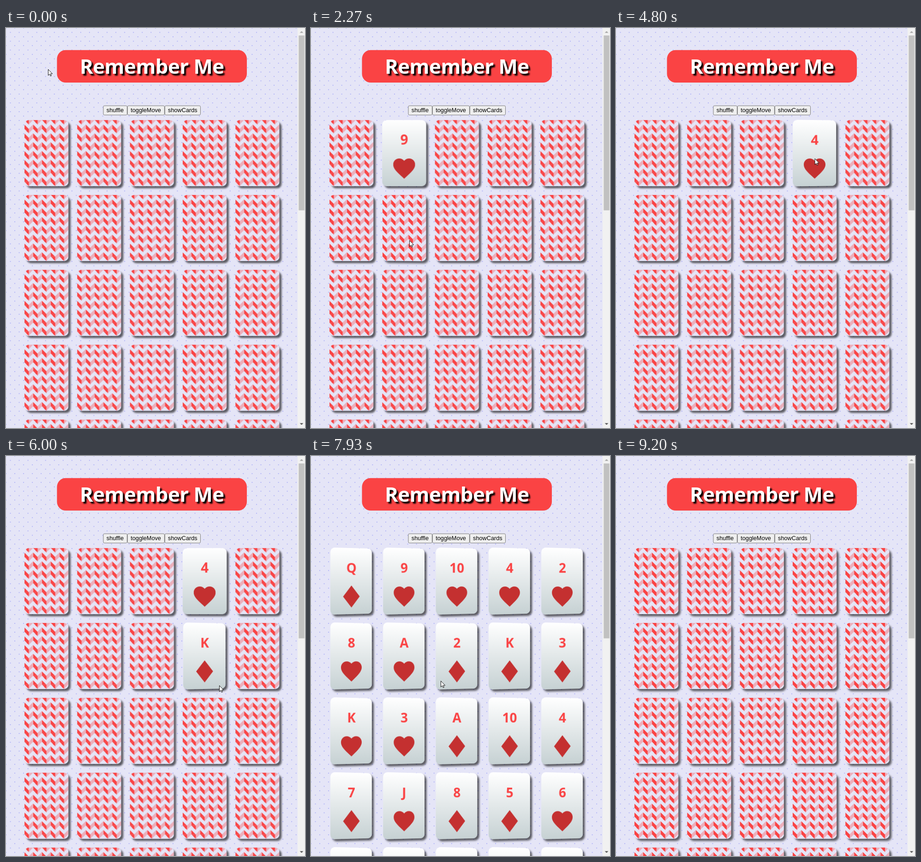
Write an HTML page that moves like this. It is 648 px wide and 865 px high and loops after 9790 ms.

```html
<!DOCTYPE html>
<html lang="en">
<head>
<meta charset="utf-8">
<title>Remember Me</title>
<style>
:root { --red: #fa4344; --pink: #fa434455; --bg: #e5e5f7; --loop: 9790ms; }
html, body { margin: 0; width: 100%; height: 100%; overflow: hidden; background: var(--bg); }
#page {
  position: absolute; left: 0; top: 0; width: 681px; height: 909px; overflow: hidden;
  transform: scale(.9525); transform-origin: 0 0;
  background:
    radial-gradient(#444cf7b0 .4px, #444cf700 1px) 0 0 / 20px 20px,
    radial-gradient(#444cf7b0 .4px, #444cf700 1px) 10px 10px / 20px 20px,
    var(--bg);
}
h1 {
  position: absolute; left: 116px; top: 50.4px; width: 432px; height: 73.5px; margin: 0;
  border-radius: 20px; background: var(--red); color: #fff; text-align: center;
  font: bold 46px/72px "Open Sans", "Noto Sans", sans-serif; letter-spacing: -.6px;
  text-shadow: 4px 4px 3px #000;
}
#bar { position: absolute; left: 0; top: 176.4px; width: 664px; display: flex; justify-content: center; }
#bar span {
  box-sizing: border-box; height: 22px; padding: 0 7px; border: 1px solid #767676; border-radius: 3px;
  background: #efefef; color: #000; font: 13.333px/20px "Liberation Sans", Arial, sans-serif;
}
#bar .hot { animation: hover var(--loop) step-end infinite; }
@keyframes hover {
  0%, 78%, 100% { background: #efefef; border-color: #767676; }
  72.5% { background: #e3e3e3; border-color: #4f4f4f; }
}

#deck { position: absolute; left: 32px; top: 199px; width: 600px; display: flex; flex-wrap: wrap; }
.card {
  position: relative; width: 100px; height: 150px; margin: 10px;
  transform-style: preserve-3d; animation: all var(--loop) ease infinite;
}
.face {
  position: absolute; inset: 0; border-radius: 10px; backface-visibility: hidden;
  box-shadow: 5px 5px 4px rgba(0, 0, 0, .6);
}
.back {
  background:
    linear-gradient(135deg, var(--pink) 25%, transparent 25%) -10px 0 / 20px 20px,
    linear-gradient(225deg, var(--red) 25%, transparent 25%) -10px 0 / 20px 20px,
    linear-gradient(315deg, var(--pink) 25%, transparent 25%) 0 0 / 20px 20px,
    linear-gradient(45deg, var(--red) 25%, var(--bg) 25%) 0 0 / 20px 20px;
}
.front { transform: rotateY(180deg); background: linear-gradient(#fff, #c6d1d3); }
.front b {
  position: absolute; left: 0; top: 24px; width: 100%; text-align: center; color: var(--red);
  font: bold 31px/40px "Open Sans", "Noto Sans", sans-serif;
}
.front svg { position: absolute; left: 25px; top: 85px; width: 50px; height: 50px; fill: #c43030; }

/* each card turns over on its click and back with its pair; all turn at the end */
@keyframes all {
  0%, 76.02%, 94.4%, 100% { transform: perspective(1000px) rotateY(0deg); }
  84.19%, 86.23% { transform: perspective(1000px) rotateY(-180deg); }
}
@keyframes pick1 {
  0%, 9.04%, 41.18%, 76.02%, 94.4%, 100% { transform: perspective(1000px) rotateY(0deg); }
  17.21%, 33.01%, 84.19%, 86.23% { transform: perspective(1000px) rotateY(-180deg); }
}
@keyframes pick2 {
  0%, 22.73%, 41.18%, 76.02%, 94.4%, 100% { transform: perspective(1000px) rotateY(0deg); }
  30.9%, 33.01%, 84.19%, 86.23% { transform: perspective(1000px) rotateY(-180deg); }
}
@keyframes pick3 {
  0%, 43.16%, 74.41%, 76.02%, 94.4%, 100% { transform: perspective(1000px) rotateY(0deg); }
  51.33%, 66.24%, 84.19%, 86.23% { transform: perspective(1000px) rotateY(-180deg); }
}
@keyframes pick4 {
  0%, 56.03%, 74.41%, 76.02%, 94.4%, 100% { transform: perspective(1000px) rotateY(0deg); }
  64.2%, 66.24%, 84.19%, 86.23% { transform: perspective(1000px) rotateY(-180deg); }
}

#scroll { position: absolute; left: 664px; top: 0; width: 17px; height: 909px; background: #f1f1f1; }
#scroll i { position: absolute; left: 2px; top: 17px; width: 13px; height: 397px; background: #c1c1c1; }
#scroll svg { position: absolute; left: 0; top: 0; }

#cursor {
  position: absolute; left: 0; top: 0; width: 14px; height: 20px; overflow: visible;
  animation: move var(--loop) linear infinite;
}
@keyframes move {
  0%, .5% { transform: translate(91px, 89px); }
  1.3% { transform: translate(190px, 130px); }
  2% { transform: translate(325px, 205px); }
  2.7% { transform: translate(285px, 250px); }
  3.3%, 5.1% { transform: translate(246px, 264px); }
  6.8%, 14% { transform: translate(235px, 265px); }
  16.2% { transform: translate(287px, 400px); }
  17.8% { transform: translate(262px, 493px); }
  19.1% { transform: translate(230px, 468px); }
  21.1%, 26% { transform: translate(213px, 459px); }
  31.3% { transform: translate(499px, 588px); }
  33.4%, 37.4% { transform: translate(502px, 584px); }
  40.8%, 49% { transform: translate(430px, 280px); }
  53.1% { transform: translate(476px, 474px); }
  54.4%, 56.5% { transform: translate(468px, 476px); }
  59%, 61.3% { transform: translate(462px, 496px); }
  66%, 68% { transform: translate(462px, 497px); }
  73%, 77.2% { transform: translate(387px, 182px); }
  81%, 82% { transform: translate(281px, 486px); }
  85.8%, 100% { transform: translate(281px, 880px); }
}
</style>
</head>
<body>
<svg width="0" height="0" style="position:absolute">
  <symbol id="h" viewBox="0 0 50 50"><path d="M25 48L21.4 44.7C8.5 33 0 25.300 0 15.900 0 8.200 6 2.200 13.700 2.200 18.100 2.200 22.300 4.200 25 7.400 27.700 4.200 31.900 2.200 36.300 2.200 44 2.200 50 8.200 50 15.900 50 25.300 41.500 33 28.600 44.700Z"/></symbol>
  <symbol id="d" viewBox="0 0 50 50"><path d="M25 0L45 25 25 50 5 25Z"/></symbol>
</svg>
<div id="page">
  <h1>Remember Me</h1>
  <div id="bar"><span>shuffle</span><span>toggleMove</span><span class="hot">showCards</span></div>
  <div id="deck"></div>
  <div id="scroll">
    <i></i>
    <svg width="17" height="909"><path d="M4.500 11h8l-4-4z" fill="#a3a3a3"/><path d="M4.500 897h8l-4 4z" fill="#505050"/></svg>
  </div>
</div>
<svg id="cursor"><path d="M.5 .5V13.500L3.500 10.700 5.400 15 7.300 14.200 5.500 10H9.600Z" fill="#fff" stroke="#000" stroke-width=".9"/></svg>
<script>
const cards = "Qd 9h 10h 4h 2h 8h Ah 2d Kd 3d Kh 3h Ad 10d 4d 7d Jh 8d 5d 6h 9d Jd Qh 5h 7h".split(" ");
const picks = { 1: "pick1", 6: "pick2", 3: "pick3", 8: "pick4" };
deck.innerHTML = cards.map((card, i) => `
  <div class="card" style="animation-name:${picks[i] || "all"}">
    <div class="face back"></div>
    <div class="face front"><b>${card.slice(0, -1)}</b><svg><use href="#${card.slice(-1)}"/></svg></div>
  </div>`).join("");
</script>
</body>
</html>
```
